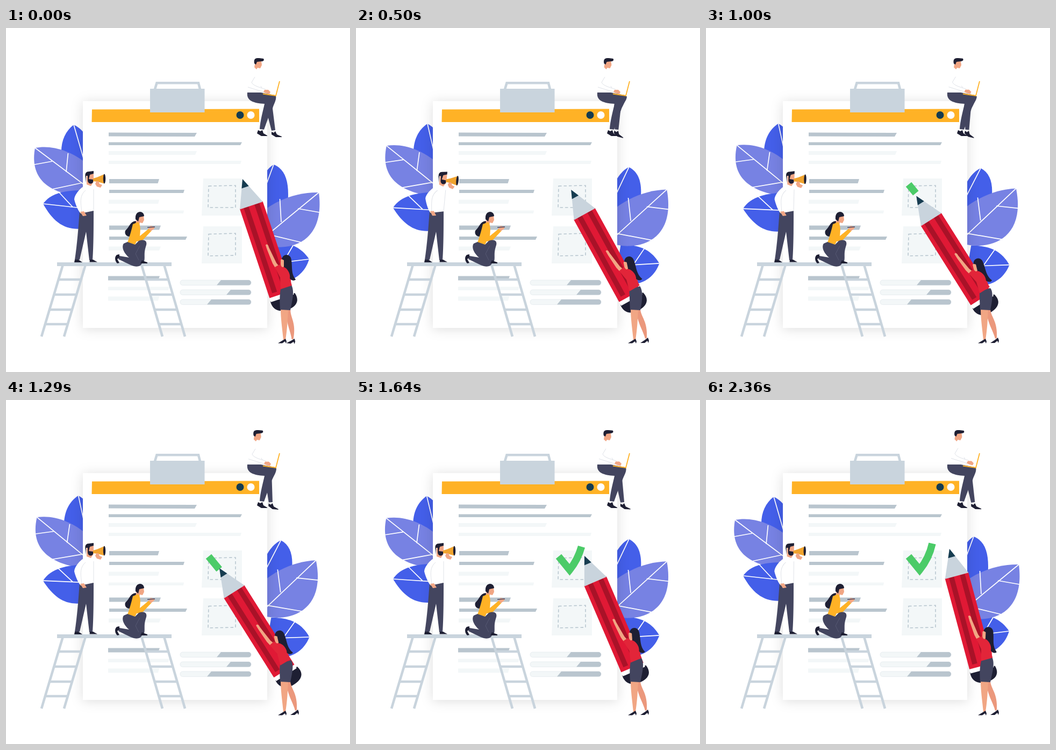
Write an HTML page that moves like this. It is 640 px wide and 640 px high and loops after 2430 ms.

```html
<!DOCTYPE html>
<html lang="en">
<head>
<meta charset="utf-8">
<title>Checklist</title>
<style>
html, body { margin: 0; height: 100%; overflow: hidden; background: #fff; }
svg { display: block; width: 100%; height: 100%; }
.vein { fill: none; stroke: #fff; stroke-width: 1.7; }
.blue { fill: #445fe9; }
.violet { fill: #7782e3; }
.steel { fill: #c9d4dd; }
.line { fill: #b9c5ce; }
.pale { fill: #f3f7f8; }
.dark { fill: #1e1f33; }
.cloth { fill: #43455f; }
.skin { fill: #f1a684; }
.fold { fill: none; stroke: #dfe2e8; stroke-width: 1; }
.frame { fill: none; stroke: #c9d4dd; stroke-width: 4.6; }
.dash { fill: none; stroke: #b9c7d0; stroke-width: 1.6; stroke-dasharray: 5.5 4; }
</style>
</head>
<body>
<svg viewBox="0 0 640 640">
  <g id="leafL1">
    <path class="blue" d="M126 180C104 197 97 225 108 265L160 300C170 250 160 195 126 180z"/>
    <path class="vein" d="M126 180L148 256"/>
  </g>
  <g id="leafL2">
    <path class="violet" d="M54 223C85 217 120 228 150 252L155 315C110 312 40 300 54 223z"/>
    <path class="vein" d="M54 223L146 292M53 254L86 248M112 268L115.500 233M81 301L142 288"/>
  </g>
  <g id="leafL3">
    <path class="blue" d="M69 327C85 304 120 300 155 303L160 370C115 382 90 365 69 327z"/>
    <path class="vein" d="M69 327L150 336M98 305L124 333"/>
  </g>
  <g id="leafR1">
    <path class="blue" d="M498 254C484 262 470 285 466 320L475 370L520 360C530 300 526 265 498 254z"/>
    <path class="vein" d="M498 254L478 308"/>
  </g>
  <g id="leafR3">
    <path class="blue" d="M564 430C545 402 520 398 490 400L484 474C535 478 556 456 564 430z"/>
    <path class="vein" d="M564 430L490 439M535 403L515 437"/>
  </g>
  <g id="leafR2">
    <path class="violet" d="M582 306C548 305 510 316 476 342L470 400C520 420 595 405 582 306z"/>
    <path class="vein" d="M582 306L480 390M583 343L543 336M512 361L509.500 318M550 399L484 383"/>
  </g>

  <path fill="#fff" d="M143 136H486V558H143z" style="filter:drop-shadow(0 2px 11px #0002)"/>
  <path fill="#ffb226" d="M160 151.500L471 150.500V175H159.500z"/>
  <circle cx="435.500" cy="162" r="7" fill="#163c50"/>
  <circle cx="455.500" cy="162" r="7" fill="#fff"/>
  <path class="frame" d="M277 114L280.500 102.300H358L361 114"/>
  <path class="steel" d="M268 113H369.500V157H268z"/>

  <path class="line" d="M191 194.500L355 195L351 202L191 201.500z
    M191 212.400H439L436 218H191zM192 281H285L282.500 289H192zM192 301H332L330 307H192z
    M192 367.500H288L285 375.500H192zM192 388H337L334 394H192zM190 461.500H286L283 469.500H190z"/>
  <path class="pale" d="M191 229H355L352 236H191zM191 247H438L436 253H191z
    M191 319.500H285L283 327H191zM191 339.500H331L330 345H191zM191 406.500H288L285 414H191z
    M190 481.500H304L302 488H190zM190 499.500H285L283 507.500H190z
    M367 280H439V349H364zM367 369H439V438H364z"/>
  <path class="dash" d="M377 294L427 293V334H376zM377 383.500L427 382V423L376 424z"/>
  <g id="bars"></g>

  <path id="tick" fill="none" stroke="#4bcb68" stroke-width="13.500" stroke-miterlimit="6"
    d="M377 291L397.500 316C408 303 417 285 421 267"/>

  <!-- ladder platform -->
  <path class="frame" d="M106 440L66 574M148 440L108 574M252 440L291 574M294 440L333 574
    M98 468h42M90 496h42M81 524h42M73 551h42M259 468h42M268 496h42M276 524h42M284 551h42"/>
  <path class="steel" d="M95 436H308V443H95z"/>

  <!-- man with megaphone -->
  <path class="cloth" d="M137 338H163C163 370 163 405 161 432H155L149 379L137 431H128C132 405 135 370 137 338z"/>
  <path class="dark" d="M128 431H135L142 436H127zM156 431H162L170 435.500H155.500z"/>
  <g id="caller">
    <path fill="#fff" d="M150 291C135 299 127 312 127 319C130 331 135 341 139 345L163 340V295z"/>
    <path class="fold" d="M163 300V339M148 302C135 313 140 329 141 343"/>
    <path class="skin" d="M138 342L145 341L150 349L143 350zM150 274L163 271V286L158 294L150 291z"/>
    <path class="dark" d="M148 279C146 270 149 267 155 267L163 266V271L156 273L154 281L162 282V287C158 292 152 289 152 283V275H149V288z"/>
    <path fill="#f0a42f" d="M162 280L170 277.500L183 272V289.500L170 286L162 285z"/>
    <ellipse cx="183" cy="280.500" rx="2.200" ry="9" class="dark"/>
    <path class="skin" d="M168 285L172 285L174 290L179 292L176 297L169 295L166 290z"/>
  </g>

  <!-- kneeling woman -->
  <path class="dark" d="M241 359C230 361 231 369 222 377C219 386 229 391 235 386C240 380 238 370 245 363z"/>
  <path class="skin" d="M244 350H256L257 357L254 363L249 362L248 368L241 365z"/>
  <path class="dark" d="M241 356C239 338 257 339 257 350L248 352L246 360z"/>
  <path fill="#ffb226" d="M236 365L246 361C251 367 250 378 249 387L266 373L271 377L253 396L243 397L240 403L226 399C230 388 233 378 236 365z"/>
  <path class="skin" d="M265 373L269 368L277 370L275 374L269 378z"/>
  <path d="M263 371L277 370" stroke="#43455f" stroke-width="1.600"/>
  <path class="cloth" d="M226 398L240 403L247 396C259 392 264 397 260 407C256 419 259 427 257 434L253 437C251 445 241 445 232 441L209 430L211 424L229 427C220 420 214 408 219 401z"/>
  <path d="M249 405L241 420L247 432" fill="none" stroke="#5b5d78" stroke-width=".8"/>
  <path class="dark" d="M211 421L206 422C201 427 203 434 207 438L211 437L207 430L211 427zM253 432L257 434L263 436V438H250z"/>

  <!-- man with laptop -->
  <g id="shin">
    <path class="cloth" d="M479 128L502 126C504 134 497 143 496 150L501 190L494 191L484 152z"/>
    <path class="dark" d="M494 193L498 195L501 192L504 198L513 202V203H502L494 198z"/>
  </g>
  <path class="cloth" d="M449 120H474L500 125C505 132 497 143 494 150L480 189L472 188C473 172 478 155 481 141C460 140 447 135 449 120z"/>
  <path class="dark" d="M469 190L473 192L477 190L479 196L486 200V201H475L467 196z"/>
  <g id="sitter">
    <path class="skin" d="M464 62L475 61L476 69L473 75L468 74L466 77L462 73z"/>
    <path class="dark" d="M462 66C460 55 467 56 471 56L479 57C481 60 479 62 475 62L467 63L465 68z"/>
  </g>
  <g id="typing">
    <path class="fold" d="M463 91L457 101C459 107 470 110 483 114M450 110L479 119M474 108L476 112"/>
    <path class="skin" d="M481 115L488 115L492 119L490 123L483 121L479 119z"/>
  </g>
  <path d="M509 99L502 126L478 122.500" fill="none" stroke="#ffb226" stroke-width="1.800"/>

  <!-- pencil, tip at the local zero point -->
  <g id="pencil">
    <path class="dark" d="M-23 232H25C30 250 18 258 0 257C-14 257 -25 248 -23 232z"/>
    <path fill="#fff" d="M-22.500 225H22.500V234H-22.500z"/>
    <path fill="#e01935" d="M-22.500 51H22.500V226H-22.500z"/>
    <path fill="#a91228" d="M-15 52H-5.500V219H-15zM6 52H15.500V219H6z"/>
    <path class="steel" d="M0 0L22.500 52H-22.500z"/>
    <path fill="#163c50" d="M0 0L7 16H-7z"/>
  </g>

  <!-- woman with pencil -->
  <g id="leg">
    <path fill="#eb987c" d="M521 522L529 523C530 538 543 545 541 577L538 578C534 562 523 549 521 522z"/>
    <path class="dark" d="M543 576L545 581L544 586L542 582L537 586H529L538 580z"/>
  </g>
  <path class="skin" d="M511 522H525C524 545 523 562 520 580H516C514 560 511 540 511 522z"/>
  <path class="dark" d="M520 578L522 583L521 587L519 583L514 586.500H506L515 581z"/>
  <path id="skirt" class="cloth"/>
  <g id="lady">
    <path class="skin" d="M511 431L518 428L522 446L513 447L511 440zM483 404C485 401 488 403 489 408L503 437L510 446L502 448L496 438L486 413z"/>
    <path fill="#e22539" d="M500 445L509 440L514 445C520 443 526 444 530 448C531 459 528 469 532 479L511 486L510 464z"/>
    <path class="dark" d="M513 430C515 419 530 419 531 432C533 446 530 457 539 468C536 471 531 470 528 466C530 456 522 446 517 445L517 432z"/>
  </g>
</svg>
<script>
const $ = id => document.getElementById(id);
const LOOP = 2430, STEP = LOOP / 34;
const TIMES = [0, 290, 710, 1290, 1640, 1930, 2360];

const tracks = {
  swayL: [0, .45, .97, .97, .63, .3, 0],
  swayR: [0, .43, .9, 1, .72, .4, 0],
  tipX: [440, 419, 389, 397, 425, 453, 453],
  tipY: [281, 288, 311, 313, 290, 277, 277],
  tilt: [18.5, 23.5, 32.2, 32.2, 23.2, 15.1, 15.1],
  drawn: [-45, -22, 12, 31, 81, 100, 100],
  lean: [0, -6.7, -14.5, -12.5, -4.2, 2.7, 2.7],
  waistX: [0, -2, -3, -1, 0, 1, 1],
  waistY: [0, 0, 5, 6, 2, 0, 0],
  leg: [7, 0, 0, 0, 0, 0, 0],
  caller: [0, 6.5, 3.8, 0, 0, 0, .7],
  shin: [0, 7, 17, 5.3, 2, 2.5, .7],
  nod: [0, -.5, -.7, -1.4, -1.2, 0, .5],
  hand: [0, -2, 2, 1, 2, 8, 6]
};

// smooth monotone curve through the keys
function sample(keys, t) {
  const slope = i => (keys[i + 1] - keys[i]) / (TIMES[i + 1] - TIMES[i]);
  const last = keys.length - 1;
  const tangent = i => {
    if (i === 0) return slope(0);
    if (i === last) return slope(last - 1);
    const a = slope(i - 1), b = slope(i);
    return a * b > 0 ? 2 * a * b / (a + b) : 0;
  };
  let i = 0;
  while (i < last - 1 && t >= TIMES[i + 1]) i++;
  const h = TIMES[i + 1] - TIMES[i], u = Math.min(1, (t - TIMES[i]) / h), v = 1 - u;
  return v * v * (1 + 2 * u) * keys[i] + u * u * (3 - 2 * u) * keys[i + 1]
    + h * u * v * (v * tangent(i) - u * tangent(i + 1));
}

const place = (id, value) => $(id).setAttribute('transform', value);
const turn = (id, angle, x, y) => place(id, `rotate(${angle} ${x} ${y})`);

$('bars').innerHTML = [[469, 400], [487, 418], [505, 382]].map(([y, x]) =>
  `<rect x="324" y="${y}" width="132" height="9.6" rx="4.8" fill="#f3f7f8" stroke="#e0e7eb" stroke-width=".7"/>
   <path class="line" d="M${x} ${y}H451.200a4.800 4.800 0 0 1 0 9.600H${x - 8}z"/>`).join('');

function render(t) {
  const p = {};
  for (const name in tracks) p[name] = sample(tracks[name], t);

  turn('leafL1', 4 * p.swayL, 165, 305);
  turn('leafL2', 2.6 * p.swayL, 167, 302);
  turn('leafL3', -4 * p.swayL, 205, 334);
  turn('leafR1', 7 * p.swayR, 448, 368);
  turn('leafR2', -4 * p.swayR, 468, 377);
  turn('leafR3', 5 * p.swayR, 438, 441);

  place('pencil', `translate(${p.tipX} ${p.tipY}) rotate(${-p.tilt})`);
  $('tick').setAttribute('stroke-dasharray', `${Math.max(0, p.drawn)} 300`);

  place('lady', `translate(${p.waistX} ${p.waistY}) rotate(${p.lean} 519 485)`);
  const x = p.waistX, y = p.waistY;
  $('skirt').setAttribute('d', `M${511 + x} ${485 + y}L${531 + x} ${478 + y}
    C${537 + x} 490 533 505 529 525L510 524C509 510 509 497 ${511 + x} ${485 + y}z`);
  turn('leg', p.leg, 524, 526);

  turn('caller', p.caller, 150, 340);
  turn('shin', p.shin, 498, 135);
  turn('sitter', p.nod, 470, 120);
  place('typing', `translate(${p.hand} ${-p.hand / 4})`);
}

// the picture advances 34 times per loop
function tick(now) {
  const i = Math.min(33, Math.floor((now % LOOP + 5) / STEP));
  render(Math.round(i * STEP / 10) * 10);
  requestAnimationFrame(tick);
}
render(0);
requestAnimationFrame(tick);
</script>
</body>
</html>
```
